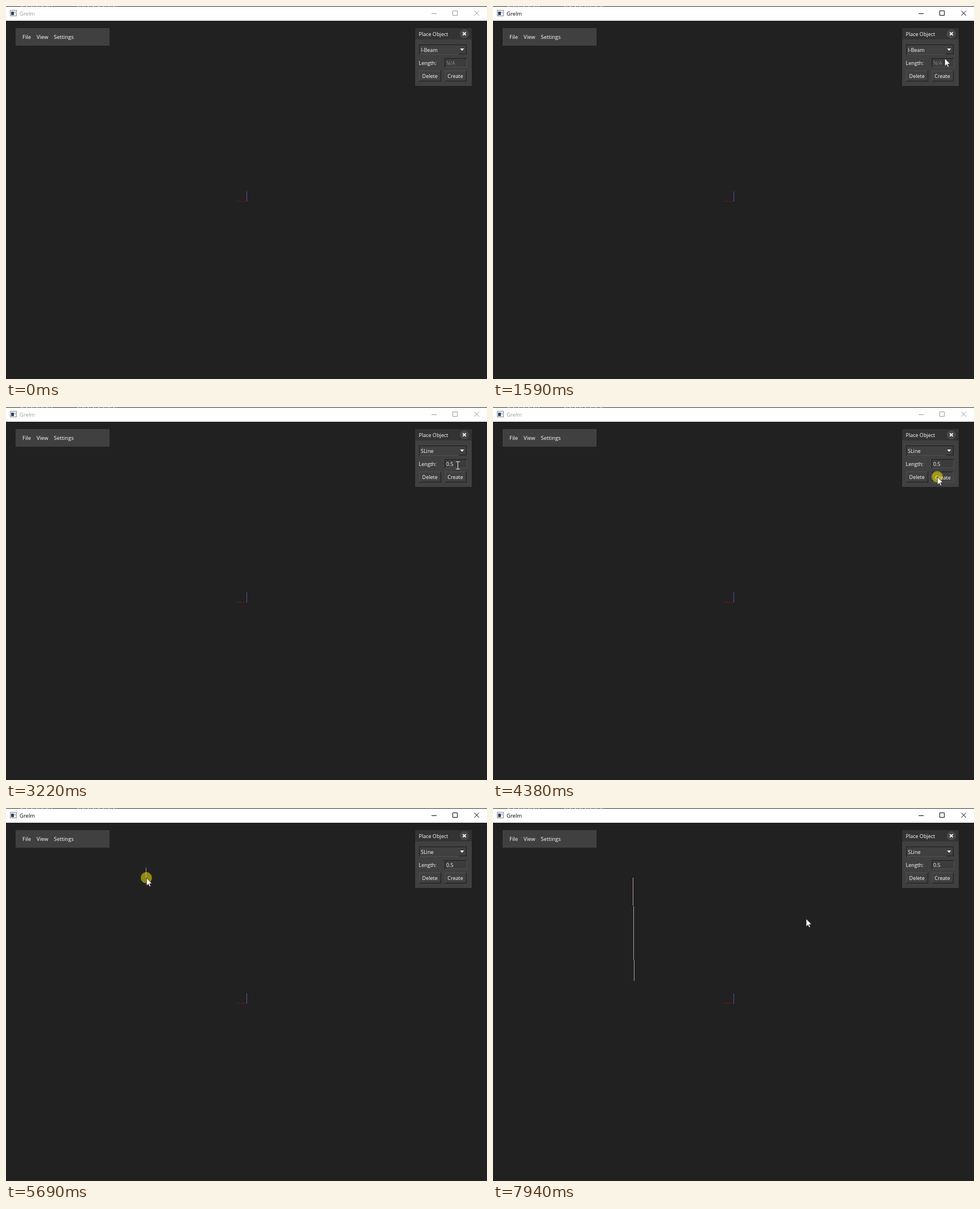
An HTML page for the animation above (8 s loop, 850 by 658 pixels).

```html
<!DOCTYPE html>
<html lang="en">
<head>
<meta charset="utf-8">
<title>Grelm</title>
<style>
  html, body { margin: 0; width: 100%; height: 100%; overflow: hidden; background: #212121; }
  svg { display: block; width: 850px; height: 658px; }
  text { font: 9px "Open Sans", "Noto Sans", sans-serif; fill: #fff; white-space: pre; }
  .big { font-size: 9.5px; }
  .chrome { color: #999; }
  .chrome.active { color: #000; }
  .chrome text { fill: currentColor; }
  .chrome path { stroke: currentColor; fill: none; }
  .dim { fill: #858585; }
  .dark { stroke: #1c1c1c; fill: none; }
  .lite { stroke: #505050; fill: none; }
  .crisp { shape-rendering: crispEdges; }
  .mid { text-anchor: middle; }
</style>
</head>
<body>
<svg viewBox="0 0 850 658">
  <rect width="850" height="658" fill="#212121"/>

  <rect y="1" width="850" height="25" fill="#fff"/>
  <rect width="850" height="1" fill="#2b2b2b"/>
  <path d="M26 .5H82M126 .5H197" stroke="#8a8a8a" stroke-dasharray="3 2 1 3"/>
  <g class="crisp">
    <rect x="7.5" y="7.5" width="11" height="10" fill="#f4f4f0" stroke="#8c8c8c"/>
    <rect x="9" y="10" width="5" height="6" fill="#2b3f78"/>
    <rect x="15" y="10" width="2" height="3" fill="#b9c3a8"/>
  </g>
  <g class="chrome" id="chrome">
    <text class="big" x="24" y="17">Grelm</text>
    <path d="M752 13.5H761M789.5 8.5H797.5V16.5H789.5Z"/>
    <path d="M827.5 8.5L836 17M836 8.5L827.5 17"/>
  </g>

  <rect x="17" y="39" width="166" height="31" fill="#404040"/>
  <text class="big" x="29" y="58">File</text>
  <text class="big" x="54" y="58">View</text>
  <text class="big" x="84.5" y="58">Settings</text>

  <g class="crisp">
    <rect x="408" y="344" width="17" height="1" fill="#7d1010"/>
    <rect x="425" y="327" width="1" height="18" fill="#5252a6"/>
  </g>
  <line id="beam" class="crisp"/>

  <rect x="723" y="39" width="100" height="102" fill="#404040"/>
  <rect x="723" y="39" width="100" height="20" fill="#333"/>
  <text x="729.5" y="53">Place Object</text>
  <circle cx="810" cy="49" r="8" fill="#484848"/>
  <path d="M807.3 46.3L812.7 51.7M812.7 46.3L807.3 51.7" stroke="#fff" stroke-width="1.8"/>

  <path class="lite crisp" d="M731 85.5H800"/>
  <path class="dark crisp" d="M730.5 86V68.5H813.5V84.5H800"/>
  <path d="M802.5 75H809.5L806 79Z" fill="#fff"/>
  <text id="kind" x="733" y="80.5"></text>

  <text x="729.5" y="104">Length:</text>
  <rect x="776" y="92" width="38" height="15" fill="#3c3c3c"/>
  <path class="lite crisp" d="M777 107.5H814.5V93"/>
  <path class="dark crisp" d="M775.5 108V92.5H814"/>
  <text id="size" x="778" y="104"></text>

  <path class="lite crisp" d="M730.5 132V114.5H768"/>
  <path class="dark crisp" d="M730 132.5H768.5V114"/>
  <text class="mid" x="749.2" y="127">Delete</text>
  <path class="lite crisp" id="edgeA" d="M776.5 132V114.5H813"/>
  <path class="dark crisp" id="edgeB" d="M776 132.5H813.5V114"/>
  <text class="mid" id="create" x="794" y="127">Create</text>

  <g id="popup">
    <rect x="732" y="87" width="85" height="23" fill="#000" opacity=".3"/>
    <rect class="crisp" x="730.5" y="85.5" width="84" height="23" fill="#2a2a2a" stroke="#777"/>
    <rect id="pick" x="731" width="83" height="11" fill="#6c6c6c"/>
    <text x="733" y="95.3">I-Beam</text>
    <text x="733" y="106.3">SLine</text>
  </g>

  <g id="cursor">
    <circle id="press" r="10" fill="#fff000" fill-opacity=".5"/>
    <path id="arrow" transform="scale(.86)" fill="#fff" stroke="#111" stroke-width=".8"
      d="M.4 .5V16.5L4.2 13L6.5 18.2L9 17.2L6.7 12H11.6Z"/>
    <path id="caret" class="crisp" d="M-3 -6.5H4M-3 6.5H4M.5 -6V6" stroke="#e8e8e8" fill="none"/>
  </g>
</svg>
<script>
const LOOP = 8000;
const $ = id => document.getElementById(id);

// Cursor moves: start, end, number of steps, path
const moves = [
  [130, 440, 5, "M779 654L721 455"],
  [900, 1670, 11, "M721 455C668 330 720 170 804 85"],
  [1750, 1900, 3, "M804 85L805 77"],
  [2360, 2750, 6, "M805 77L800 100"],
  [3220, 3520, 5, "M800 100L778 128"],
  [3690, 3770, 2, "M778 128L785 123"],
  [4460, 5150, 10, "M785 123C690 70 600 80 540 100S380 196 330 196S262 160 251 134"],
  [5230, 5460, 4, "M251 134L248 123"],
  [5930, 6700, 11, "M248 123C222 165 270 245 248 289"],
  [6770, 7310, 8, "M248 289L249 304"],
  [7710, 7940, 4, "M249 304L553 195"]
].map(([from, to, steps, d]) => {
  const path = document.createElementNS("http://www.w3.org/2000/svg", "path");
  path.setAttribute("d", d);
  return { from, to, steps, path, length: path.getTotalLength() };
});

const presses = [[590, 670], [2130, 2200], [2980, 3050], [4380, 4460], [5690, 5760], [7540, 7710]];

const within = (t, a, b) => t >= a && t < b;
const show = (id, on) => { $(id).style.display = on ? "" : "none"; };
const set = (id, attrs) => {
  for (const key in attrs) $(id).setAttribute(key, attrs[key]);
};

function cursorAt(t) {
  const move = moves.filter(m => t >= m.from).pop() || moves[0];
  const gap = (move.to - move.from) / (move.steps - 1);
  const step = Math.floor((t - move.from + 3) / gap) + 1;
  const u = Math.max(0, Math.min(1, step / move.steps));
  return move.path.getPointAtLength(move.length * u * u * (3 - 2 * u));
}

function drawBeam(t, p) {
  const placed = t >= 5930;
  show("beam", placed || (t >= 4460 && p.x < 723));
  if (!placed) {
    const x = p.x - .5;
    set("beam", { x1: x, y1: p.y - 18, x2: x, y2: p.y, stroke: "#999" });
    return;
  }
  const end = t >= 7540 ? { x: 249.4, y: 305 } : { x: p.x + .4, y: p.y - (t < 6770 ? 2 : 0) };
  set("beam", { x1: 247.5, y1: 123, x2: end.x, y2: end.y, stroke: "#b8a19e" });
}

function draw(t) {
  const p = cursorAt(t);
  const chosen = t >= 3050;
  const pressed = within(t, 4380, 4460);
  const caret = within(t, 3050, 3520) && p.y < 107;

  $("chrome").classList.toggle("active", within(t, 590, 2200) || t >= 5690);
  $("kind").textContent = chosen ? "SLine" : "I-Beam";
  $("size").textContent = chosen ? "0.5" : "N/A";
  $("size").classList.toggle("dim", !chosen);

  show("popup", within(t, 2200, 3050));
  set("pick", { y: p.y > 97 ? 97 : 86 });

  set("create", { transform: pressed ? "translate(1 1)" : "" });
  set("edgeA", { class: pressed ? "dark crisp" : "lite crisp" });
  set("edgeB", { class: pressed ? "lite crisp" : "dark crisp" });

  drawBeam(t, p);

  show("cursor", t >= 130);
  show("press", presses.some(([a, b]) => within(t, a, b)));
  show("arrow", !caret);
  show("caret", caret);
  set("cursor", { transform: `translate(${Math.round(p.x)} ${Math.round(p.y)})` });
}

function tick() {
  draw(performance.now() % LOOP);
  requestAnimationFrame(tick);
}
tick();
</script>
</body>
</html>
```
